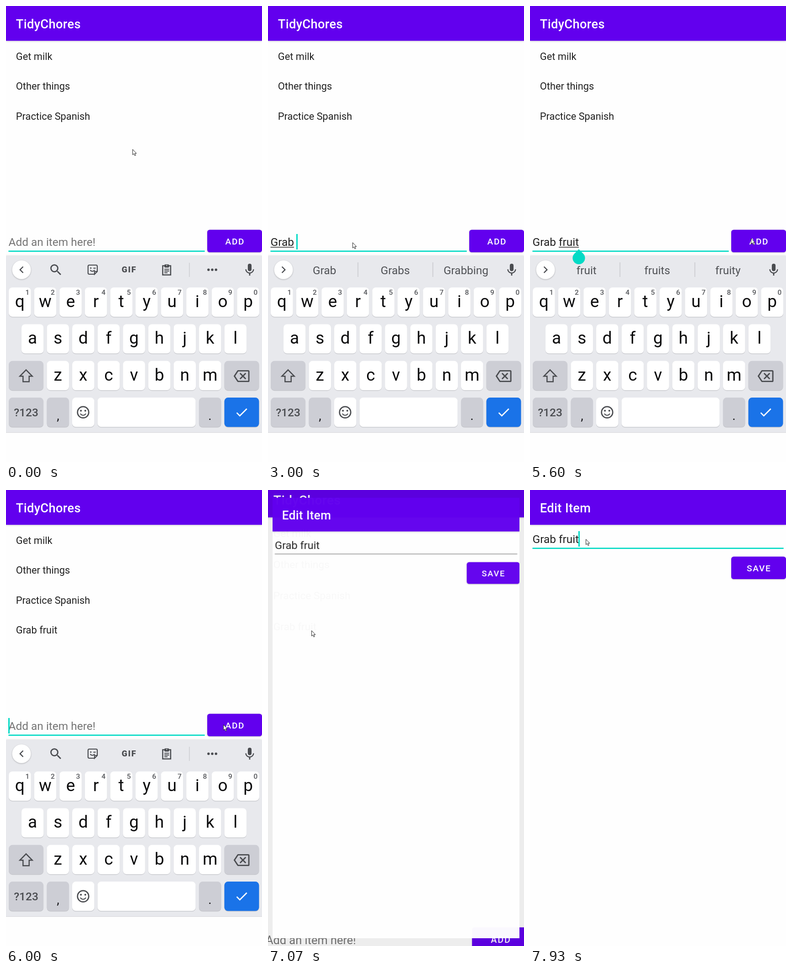
These frames come from a looping animation (561x998 px, 8000 ms). An HTML page with a canvas:

```html
<!DOCTYPE html>
<html lang="en">
<head>
<meta charset="utf-8">
<title>Task list</title>
<style>
html, body { margin: 0; width: 100%; height: 100%; overflow: hidden; background: #fefefe; }
canvas { display: block; width: 561px; height: 998px; }
</style>
</head>
<body>
<canvas id="stage"></canvas>
<script>
const W = 561, H = 998, LOOP = 8000;
const PURPLE = '#6200ee', TEAL = '#03dac5', INK = '#212121', ICON = '#4a4c50', PAPER = '#fefefe';
const dpr = window.devicePixelRatio || 1;

function setup(canvas) {
  canvas.width = W * dpr;
  canvas.height = H * dpr;
  return canvas.getContext('2d');
}
const stage = document.getElementById('stage');
const screen = setup(stage);
const sheet = document.createElement('canvas');
const sheetCtx = setup(sheet);
let c = screen;

// time, text, underlined from, to, suggestions
const typing = [
  [0, '', 0, 0, ''],
  [1670, 'G', 0, 0, ''],
  [1730, 'Gr', 0, 0, ''],
  [1870, 'Gr', 0, 2, 'Gr Get Great'],
  [1930, 'Gra', 0, 2, 'Gr Get Great'],
  [2130, 'Gra', 0, 3, 'Gra Great Grab'],
  [2870, 'Grab', 0, 3, 'Gra Great Grab'],
  [3000, 'Grab ', 0, 4, 'Grab Grabs Grabbing'],
  [3200, 'Grab ', 0, 0, 'a the some'],
  [3470, 'Grab f', 0, 0, 'a the some'],
  [3670, 'Grab fr', 5, 6, 'f for from'],
  [3730, 'Grab fru', 5, 6, 'f for from'],
  [3800, 'Grab frui', 5, 8, 'fru fruit fruits'],
  [3930, 'Grab fruit', 5, 9, 'frui fruit fruits'],
  [4070, 'Grab fruit', 5, 10, 'fruit fruits fruity'],
  [5800, '', 0, 0, '']
];
const caretOn = [[270, 730], [1200, 2600], [2870, 4470], [5000, 5470], [5800, 6200], [6670, 7000]];
const pointerPath = [
  [0, 277, 313], [400, 185, 517], [4270, 185, 517], [4730, 112, 510], [5067, 112, 510],
  [5530, 484, 508], [5733, 484, 508], [6000, 476, 513], [6450, 105, 285], [6533, 95, 307],
  [7330, 95, 307], [7800, 122, 107]
];

// Icon outlines on a 24 unit grid.
const icons = {
  search: 'M15.5 14h-.79l-.28-.27C15.41 12.59 16 11.11 16 9.5a6.5 6.5 0 1 0-6.5 6.5c1.61 0 3.09-.59 4.23-1.57l.27.28v.79l5 4.99L20.49 19zM9.5 14a4.5 4.5 0 1 1 0-9a4.5 4.5 0 1 1 0 9z',
  mic: 'M12 14a3 3 0 0 0 3-3V5a3 3 0 0 0-6 0v6a3 3 0 0 0 3 3zM17.3 11a5.3 5.1 0 0 1-10.6 0H5c0 3.41 2.72 6.23 6 6.72V21h2v-3.28c3.28-.48 6-3.3 6-6.72z',
  smile: 'M12 2a10 10 0 1 0 0 20a10 10 0 1 0 0-20zm0 18a8 8 0 1 1 0-16a8 8 0 1 1 0 16zM7 9.5a1.5 1.5 0 1 0 3 0a1.5 1.5 0 1 0-3 0zM14 9.5a1.5 1.5 0 1 0 3 0a1.5 1.5 0 1 0-3 0zM12 16c-1.48 0-2.75-.81-3.45-2H6.88c.8 2.05 2.79 3.5 5.12 3.5s4.32-1.45 5.12-3.5h-1.67c-.7 1.19-1.97 2-3.45 2z',
  check: 'M9 16.17L4.83 12l-1.42 1.41L9 19L21 7l-1.41-1.41z',
  erase: 'M22 3H7c-.69 0-1.23.35-1.59.88L0 12l5.41 8.11c.36.53.9.89 1.59.89h15a2 2 0 0 0 2-2V5a2 2 0 0 0-2-2zm0 16H7.07L2.4 12l4.66-7H22zM10.41 17L14 13.41L17.59 17L19 15.59L15.41 12L19 8.41L17.59 7L14 10.59L10.41 7L9 8.41L12.59 12L9 15.59z'
};

const clamp = v => Math.max(0, Math.min(1, v));

function rect(x, y, w, h, color) {
  c.fillStyle = color;
  c.fillRect(x, y, w, h);
}

function box(x, y, w, h, r, color) {
  c.fillStyle = color;
  c.beginPath();
  c.roundRect(x, y, w, h, r);
  c.fill();
}

function dot(x, y, r, color) {
  c.fillStyle = color;
  c.beginPath();
  c.arc(x, y, r, 0, 7);
  c.fill();
}

function stroke(path, width, color) {
  c.strokeStyle = color;
  c.lineWidth = width;
  c.stroke(new Path2D(path));
}

function icon(name, x, y, color = ICON, scale = 1.364) {
  c.save();
  c.translate(x, y);
  c.scale(scale, scale);
  c.translate(-12, -12);
  c.fillStyle = color;
  c.fill(new Path2D(icons[name]), 'evenodd');
  c.restore();
}

function shadow(alpha, blur, dy) {
  c.shadowColor = `rgba(0,0,0,${alpha})`;
  c.shadowBlur = blur * dpr;
  c.shadowOffsetY = dy * dpr;
}

function font(size, weight = 400, gap = 0) {
  c.font = `${weight} ${size}px Roboto, sans-serif`;
  c.letterSpacing = gap + 'px';
}

function label(str, x, y, size, color, weight, gap = 0, align = 'left') {
  font(size, weight, gap);
  c.textAlign = align;
  c.fillStyle = color;
  c.fillText(str, x, y);
}

function appBar(title) {
  c.save();
  shadow(0.2, 4, 1);
  rect(0, 0, W, 76.2, PURPLE);
  c.restore();
  label(title, 21.8, 49, 27.27, '#fff', 500, 0.34);
}

function button(str, x, y) {
  c.save();
  shadow(0.25, 2.5, 0.8);
  box(441, y, 120, 49.3, 5.4, PURPLE);
  c.restore();
  label(str, x, y + 32.3, 19.1, '#fff', 500, 1.7);
}

// The top of the caret sets the place of the whole field.
function field(top, right, text, hint, from, to, focus, caret) {
  label(text || hint, 5.5, top + 26.4, 24.45, text ? INK : '#757575');
  const at = n => 5.5 + c.measureText(text.slice(0, n)).width;
  if (to > from) rect(at(from), top + 28.2, at(to) - at(from), 1.4, INK);
  if (focus) rect(5.4, top + 36.3, right - 5.4, 2.7, TEAL);
  else rect(5.4, top + 36.6, right - 5.4, 1.4, '#868686');
  if (caret) rect(Math.floor(at(text.length) - 0.5), top, 3, 34, TEAL);
}

function key(x, y, w, color = '#fff') {
  box(x, y + 1.2, w, 64.2, 8, '#c2c3c8');
  box(x, y, w, 64.2, 8, color);
}

function letters(str, x, y) {
  [...str].forEach((ch, i) => {
    const kx = x + i * 55.58;
    key(kx, y, 48.6);
    label(ch, kx + 24.2, y + 42.8, 37, '#0c0c0d', 400, 0, 'center');
  });
}

function roundButton(path) {
  c.save();
  shadow(0.25, 3, 1);
  dot(34, 577.3, 20.5, '#fff');
  c.restore();
  stroke(path, 2.4, ICON);
}

function toolbar() {
  roundButton('M37.5 570.5 L30.8 577.2 L37.5 584');
  icon('search', 109.4, 577.5);
  stroke('M194 587 H182.5 Q179.8 587 179.8 584.3 V569.8 Q179.8 567 182.5 567 H197.3 Q200 567 200 569.8 V581 L194 587 V581 H200', 2.2, ICON);
  stroke('M184.5 578 Q189 583.5 194.5 578', 2, ICON);
  dot(185.8, 573.5, 1.6, ICON);
  stroke('M191.5 573.8 H196.5', 2, ICON);
  label('GIF', 253.5, 583.3, 18, ICON, 900, 1.8);
  stroke('M343.4 568.6 H360.8 V588.6 H343.4 Z', 2.5, ICON);
  box(347, 565.5, 10.5, 7, 2, ICON);
  dot(352.2, 568, 1.1, '#e8e9ed');
  stroke('M347 576.3 H357.5 M347 580 H357.5 M347 583.7 H354', 1.9, ICON);
  rect(401.3, 562, 1.2, 31, '#c5c6ca');
  for (let i = 0; i < 3; i++) dot(443.8 + i * 8.2, 577.3, 2.7, ICON);
}

function suggestions(words) {
  roundButton('M30.6 570.5 L37.3 577.2 L30.6 584');
  words.split(' ').forEach((word, i) =>
    label(word, 123.8 + i * 155, 586.7, 24.4, '#505256', 400, 0, 'center'));
  rect(196.5, 561, 1.3, 32, '#c2c3c8');
  rect(360.7, 561, 1.3, 32, '#c2c3c8');
}

function keyboard(words) {
  const gray = '#cdced5';
  c.save();
  shadow(0.12, 3, -1);
  rect(0, 547, W, 387, '#e8e9ed');
  c.restore();
  rect(0, 933, W, 1.3, '#d8d9dc');
  rect(0, 934.3, W, 64, PAPER);
  if (words) suggestions(words); else toolbar();
  icon('mic', 534, 577.7);

  letters('qwertyuiop', 6.1, 616);
  for (let i = 0; i < 10; i++)
    label(String((i + 1) % 10), 46.8 + i * 55.58, 632.3, 15.5, '#55575b', 500, 0, 'center');
  letters('asdfghjkl', 33.9, 696.4);
  letters('zxcvbnm', 89.5, 776.8);

  key(6.1, 776.8, 76, gray);
  key(478.5, 776.8, 76, gray);
  stroke('M44 796.3 L57.6 810.3 H50.7 V822.3 H37.3 V810.3 H30.4 Z', 2.5, ICON);
  icon('erase', 516.2, 810, ICON, 1.45);

  const y = 857.1;
  key(6.1, y, 76, gray);
  key(89.5, y, 48.6, gray);
  key(145, y, 48.6);
  key(200.6, y, 215);
  key(422.9, y, 48.6, gray);
  key(478.5, y, 76, '#1a73e8');
  label('?123', 44, 898, 24.5, ICON, 500, 0, 'center');
  label(',', 114, 905.5, 28, '#18181a', 400, 0, 'center');
  label('.', 447, 905.5, 28, '#18181a', 400, 0, 'center');
  icon('smile', 169, 889.2);
  icon('check', 516.4, 889.2, '#fff');
}

function handle() {
  c.save();
  c.translate(107, 551.6);
  c.rotate(Math.PI / 4);
  box(-13.6, -13.6, 27.2, 27.2, [0, 13.6, 13.6, 13.6], TEAL);
  c.restore();
}

function listPage(t, open) {
  rect(0, 0, W, H, PAPER);
  const [, text, from, to, words] = typing.filter(s => s[0] <= t).pop();
  const items = ['Get milk', 'Other things', 'Practice Spanish'];
  if (t >= 5800) items.push('Grab fruit');
  appBar('TidyChores');
  items.forEach((item, i) => label(item, 21.8, 117.7 + i * 65.45, 21.82, INK));
  const drop = open ? 0 : 450.5;
  const caret = caretOn.some(([a, b]) => t >= a && t < b);
  field(499 + drop, 435.6, text, 'Add an item here!', from, to, true, caret);
  button('ADD', 480.5, 489.7 + drop);
  if (!open) return;
  keyboard(words);
  if (t >= 5000 && t < 5870) handle();
}

function editPage(t) {
  rect(0, 0, W, H, PAPER);
  appBar('Edit Item');
  field(90, 555.7, 'Grab fruit', '', 0, 0, t >= 7870, t >= 7930);
  button('SAVE', 475, 145.8);
}

const cubic = (u, a, b, d, e) => {
  const v = 1 - u;
  return a * v * v * v + 3 * b * v * v * u + 3 * d * v * u * u + e * u * u * u;
};

// Two joined curves: a short pick-up, then a very long settle.
function settle(x) {
  const early = x < 1 / 6;
  const xs = early ? [0, 0.05, 0.1333, 1 / 6] : [1 / 6, 0.2083, 0.25, 1];
  const ys = early ? [0, 0, 0.06, 0.4] : [0.4, 0.82, 1, 1];
  let lo = 0, hi = 1;
  for (let i = 0; i < 24; i++) {
    const mid = (lo + hi) / 2;
    if (cubic(mid, ...xs) < x) lo = mid; else hi = mid;
  }
  return cubic(lo, ...ys);
}

function zoom(scale) {
  c.translate(W / 2, H / 2);
  c.scale(scale, scale);
  c.translate(-W / 2, -H / 2);
}

function opening(t, elapsed) {
  const p = settle(clamp(elapsed / 400));
  c.save();
  zoom(1 + 0.05 * p);
  listPage(t, false);
  c.restore();
  rect(0, 0, W, H, `rgba(0,0,0,${0.085 * p})`);

  c = sheetCtx;
  c.setTransform(dpr, 0, 0, dpr, 0, 0);
  editPage(t);
  c = screen;
  c.save();
  c.globalAlpha = clamp((elapsed - 38) / 63.2);
  zoom(0.85 + 0.15 * p);
  c.drawImage(sheet, 0, 0, W, H);
  c.restore();
}

function pointer(t) {
  let i = 0;
  while (i < pointerPath.length - 2 && t >= pointerPath[i + 1][0]) i++;
  const [t0, x0, y0] = pointerPath[i], [t1, x1, y1] = pointerPath[i + 1];
  const u = clamp((t - t0) / (t1 - t0)), e = u * u * (3 - 2 * u);
  c.save();
  c.translate(x0 + (x1 - x0) * e + 0.6, y0 + (y1 - y0) * e + 0.8);
  const arrow = 'M0 0 V11.8 L2.7 9.4 L4.6 13.8 L6.6 13 L4.8 8.8 H8.3 Z';
  c.fillStyle = '#fff';
  c.fill(new Path2D(arrow));
  stroke(arrow, 1, '#222');
  c.restore();
}

function draw(now) {
  const tick = Math.floor((now % LOOP) * 0.015 + 0.06) % 120;
  const time = tick * 1000 / 15, t = time + 4;
  c = screen;
  c.setTransform(dpr, 0, 0, dpr, 0, 0);
  if (t < 7000) listPage(t, true);
  else if (t < 7400) opening(t, time - 6967);
  else editPage(t);
  pointer(time);
}

let start;
function loop(now) {
  if (start === undefined) start = now;
  draw(now - start);
  requestAnimationFrame(loop);
}
draw(0);
requestAnimationFrame(loop);
</script>
</body>
</html>
```
